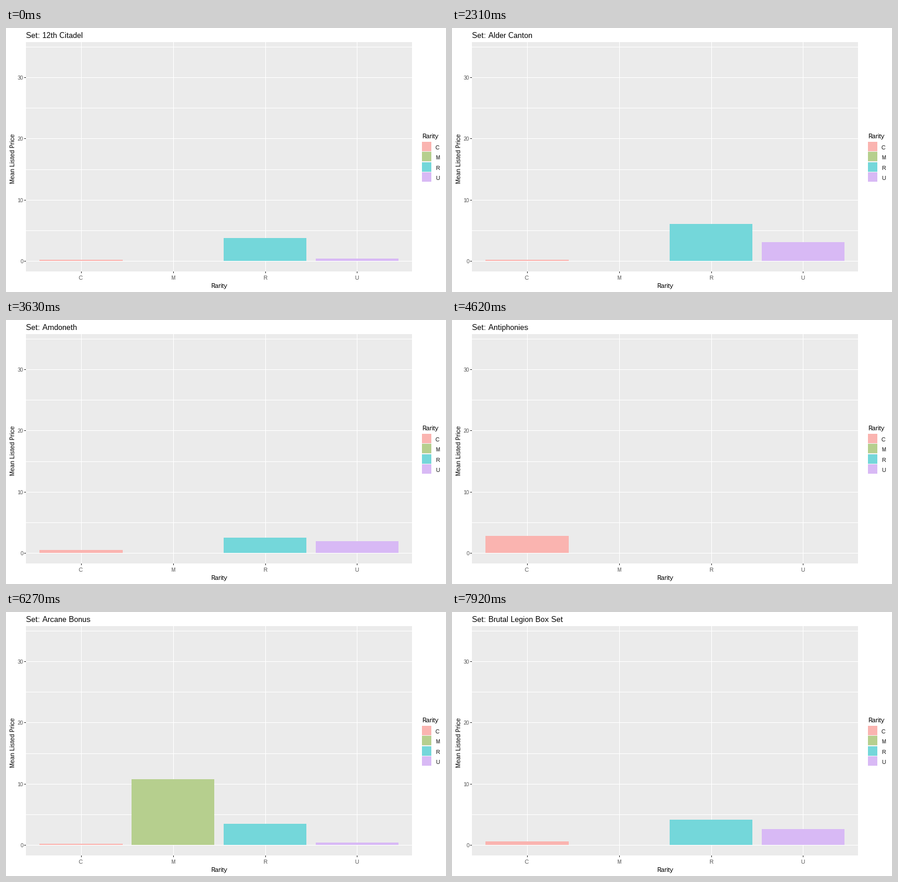
Animation of 750 by 450 pixels, one loop 8 s. Source, as a matplotlib script:

```python
import matplotlib.pyplot as plt
from matplotlib.animation import FuncAnimation
from matplotlib.patches import Rectangle

W, H, DPI = 750, 450, 100
LOOP, TICK, STEP = 8000, 20, 330
LEFT, TOP, RIGHT, BOTTOM = 34, 24, 692, 415
HALF_BAR = 70.6

plt.rcParams.update({
    "font.family": "Liberation Sans",
    "text.hinting": "native",
    "text.hinting_factor": 1,
})

FILLS = {"C": "#FAB4B0", "M": "#B6CF8E", "R": "#74D7DA", "U": "#D8B9F5"}
TYPICAL = {"C": 0.2, "R": 2.5, "U": 0.4}

# Each set with the mean prices that stand out from the typical ones
SETS = [
    ("12th Citadel", dict(R=3.8)),
    ("6th Citadel", dict(R=3.0)),
    ("Azure Thicket", dict(M=2.6, R=1.8)),
    ("Alder Canton", dict(M=8.7)),
    ("Alabaster", dict(R=6.1, U=3.1)),
    ("Amdoneth", dict(M=4.2)),
    ("Antler Spire", dict(C=0.5, U=1.95)),
    ("Antiphonies", dict(C=2.8)),
    ("Argent Bridges", dict(C=18)),
    ("Arcane Bonus", dict(C=10.3)),
    ("Avenged Harpies", dict(M=10.8, R=3.5)),
    ("Brutal Old Frontier", dict(M=6.7)),
    ("Brutal Legion Box Set", dict(C=0.6, R=4.2, U=2.6)),
]

fig = plt.figure(figsize=(W / DPI, H / DPI), dpi=DPI, facecolor="white")
ax = fig.add_axes([0, 0, 1, 1])
ax.set_xlim(0, W)
ax.set_ylim(H, 0)
ax.axis("off")


def x_of(slot):
    return 128 + 156.8 * slot


def y_of(price):
    return 397.4 - 10.423 * price


BASE = int(y_of(0))


def prices_of(special):
    if set(special) == {"C"}:  # a set made of commons only
        return special
    return {**TYPICAL, **special}


def box(x0, y0, x1, y1, color, z=1):
    patch = Rectangle((x0, y0), x1 - x0, y1 - y0, facecolor=color,
                      linewidth=0, antialiased=False, zorder=z)
    return ax.add_patch(patch)


def label(x, y, text, px, color="black", ha="left", rotation=0):
    return ax.text(x, y, text, fontsize=px * 72 / DPI, color=color, ha=ha,
                   va="baseline", rotation=rotation,
                   rotation_mode="anchor", zorder=5)


def draw_panel():
    box(LEFT, TOP, RIGHT, BOTTOM, "#EBEBEB")
    for price in range(0, 40, 5):
        y = int(y_of(price))
        box(LEFT, y, RIGHT, y + 1, "white", 2)
        if price % 10 == 0:
            box(LEFT - 3, y, LEFT, y + 1, "#333333")
            label(29.5, y + 4, str(price), 9, "#4D4D4D", "right")
    for slot, name in enumerate(FILLS):
        x = round(x_of(slot))
        box(x, TOP, x + 1, BOTTOM, "white", 2)
        box(x, BOTTOM, x + 1, BOTTOM + 3, "#333333")
        label(x - 0.5, 429, name, 9, "#4D4D4D", "center")
    label(363, 443, "Rarity", 11, ha="center")
    label(15, 265, "Mean Listed Price", 11, rotation=90)


def draw_legend():
    label(709, 188, "Rarity", 11)
    box(709, 194, 725, 262, "#F2F2F2")
    for slot, (name, fill) in enumerate(FILLS.items()):
        y = round(194 + 17.4 * slot)
        box(709, y, 725, y + 16, fill, 2)
        label(732, y + 13, name, 9)


def make_bar(slot, fill):
    x = x_of(slot)
    return box(round(x - HALF_BAR), BASE, round(x + HALF_BAR), BASE, fill, 3)


draw_panel()
draw_legend()
title = label(34, 17, "", 13)
bars = {name: make_bar(slot, fill)
        for slot, (name, fill) in enumerate(FILLS.items())}


def update(i):
    # Title and bars switch alternately, one on each step
    step = (i * TICK + TICK // 2) // STEP
    title.set_text("Set: " + SETS[step // 2][0])
    prices = prices_of(SETS[(step + 1) // 2][1])
    for name, bar in bars.items():
        top = round(y_of(prices.get(name, 0)))
        bar.set_y(top)
        bar.set_height(BASE - top)
        bar.set_visible(top < BASE)
    return [title, *bars.values()]


anim = FuncAnimation(fig, update, frames=LOOP // TICK, interval=TICK,
                     init_func=lambda: update(0), repeat=True,
                     repeat_delay=0)
plt.show()
```
